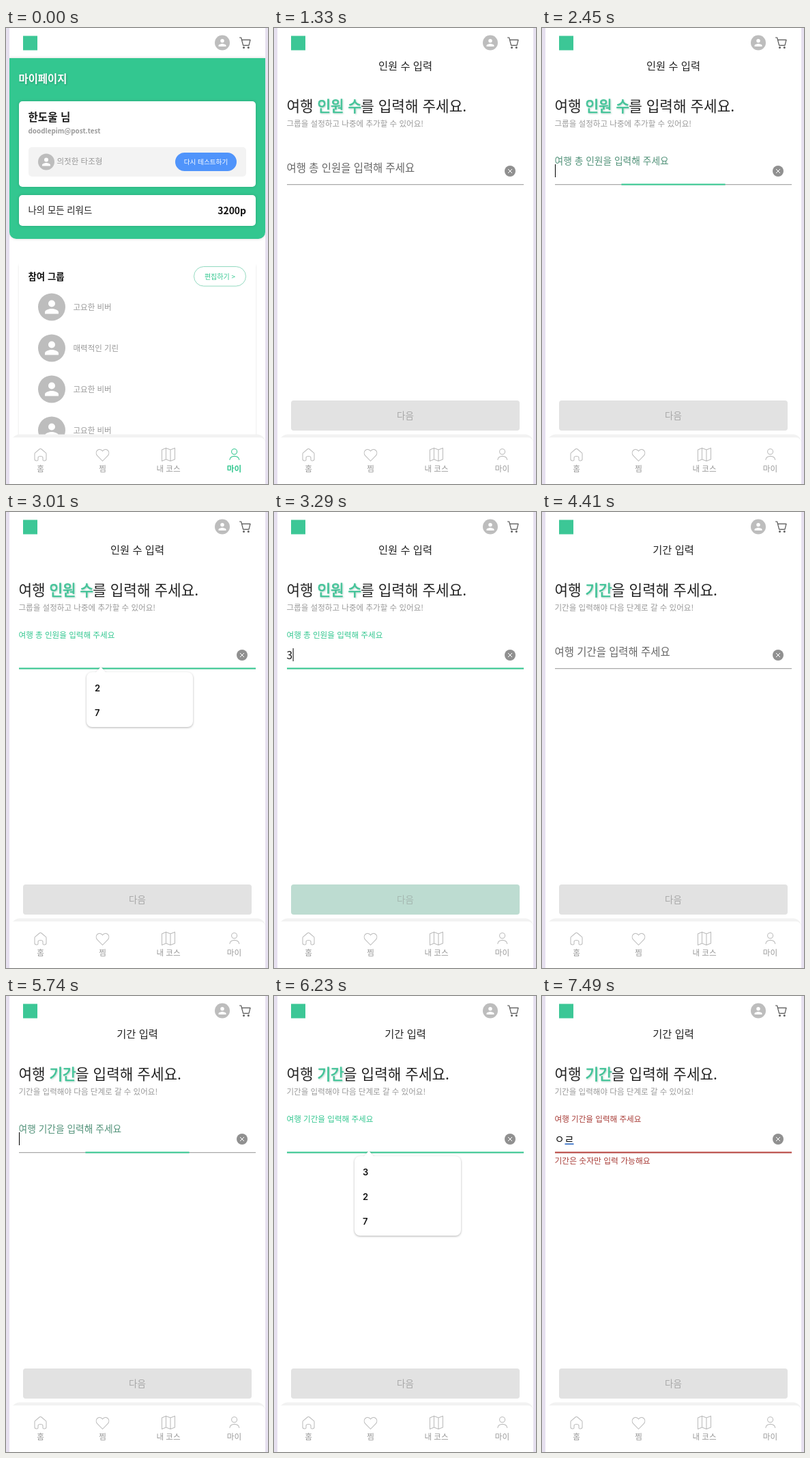
An HTML page for the animation above (8 s loop, 384 by 666 pixels).

```html
<!DOCTYPE html>
<html lang="ko">
<head>
<meta charset="utf-8">
<title>여행 정보 입력</title>
<style>
  html, body { margin: 0; height: 100%; overflow: hidden; background: #fff; }
  svg { display: block; width: 100vw; height: 100vh; }
  text { font-family: 'Noto Sans CJK KR', 'Noto Sans CJK', 'Noto Sans', sans-serif; white-space: pre; }
  .card { filter: drop-shadow(0 0 2px rgba(0,0,0,.16)); }
  .soft { filter: drop-shadow(0 4px 1.5px rgba(0,0,0,.12)); }
  .glow { filter: drop-shadow(1.5px 1.5px 1px rgba(70,150,120,.4)); }
  .lit { filter: drop-shadow(1px 1.5px 1px rgba(0,0,0,.25)); }
  .pop { filter: drop-shadow(0 1px 1.5px rgba(0,0,0,.3)); }
</style>
</head>
<body>
<svg id="stage" viewBox="0 0 384 666" preserveAspectRatio="none"></svg>
<script>
const LOOP = 8000, TICK = 70;
const GREEN = '#33c790', GRAY = '#bdbdbd', ICON = '#bcbcbc', RED = '#a83c37';
const stage = document.getElementById('stage');
const $ = id => document.getElementById(id);

// Text placed by its vertical middle
const text = (x, mid, size, str, fill, more = '') =>
  `<text x="${x}" y="${mid + size * .37}" font-size="${size}" fill="${fill}" ${more}>${str}</text>`;
const rect = (x, y, w, h, r, fill, more = '') =>
  `<rect x="${x}" y="${y}" width="${w}" height="${h}" rx="${r}" fill="${fill}" ${more}/>`;
const BOLD = 'font-weight="700"', MID = 'text-anchor="middle"', END = 'text-anchor="end"';

const avatar = (x, y, r) => {
  const k = r / 16;
  return `<circle cx="${x}" cy="${y}" r="${r}" fill="${GRAY}"/>
    <g transform="translate(${x - 12 * k} ${y - 12 * k}) scale(${k})" fill="#fff">
    <circle cx="12" cy="8" r="4"/><path d="M12 14c-2.67 0-8 1.34-8 4v2h16v-2c0-2.66-5.33-4-8-4z"/></g>`;
};

const topBar = () => rect(25, 11.5, 21, 21, 0, '#3cc796') + avatar(317, 21.5, 11) +
  `<g fill="none" stroke="#555" stroke-width="1.2" stroke-linejoin="round">
   <path d="M342 14h2.6l3 11.3h8.4l2-8h-12.4"/>
   <circle cx="348.5" cy="28.6" r=".9"/><circle cx="355.3" cy="28.6" r=".9"/></g>`;

const myPage = () => {
  const names = ['고요한 비버', '매력적인 기린', '고요한 비버', '고요한 비버'];
  return `<path d="M5 44H380V298a10 10 0 0 1-10 10H15a10 10 0 0 1-10-10z" fill="${GREEN}" class="card"/>` +
    text(18.5, 74, 15.4, '마이페이지', '#fff', BOLD + ' class="lit"') +
    rect(19, 107, 347, 125, 5, '#fff', 'class="card"') +
    text(32.5, 130, 15.6, '한도울 님', '#1a1a1a', BOLD) +
    text(32.5, 150, 9.9, 'doodlepim@post.test', '#999', BOLD) +
    rect(33, 174, 319, 43, 5, '#f3f3f3') + avatar(59, 195.5, 12) +
    text(74.5, 195, 11.55, '의젓한 타조형', '#999', 'font-weight="500"') +
    rect(248, 182, 90, 27, 13.5, '#5094fb') +
    text(293, 195.5, 9.6, '다시 테스트하기', '#fff', MID + ' font-weight="500"') +
    rect(19, 244, 347, 45, 5, '#fff', 'class="card"') +
    text(32.5, 266.5, 13.4, '나의 모든 리워드', '#222') +
    text(352, 267, 13.9, '3200p', '#111', BOLD + ' ' + END) +
    rect(19, 340, 347, 300, 5, '#fff', 'class="soft"') +
    text(32.5, 363, 13.4, '참여 그룹', '#111', BOLD) +
    rect(275.5, 348.5, 76, 28.5, 14.25, '#fff', 'stroke="#93dac0"') +
    text(313.5, 363, 10, '편집하기 &gt;', GREEN, MID + ' font-weight="500"') +
    names.map((n, i) => avatar(67, 407.5 + 60 * i, 20) +
      text(98.5, 407.5 + 60 * i, 11.5, n, '#999')).join('');
};

const form = () => `
  ${text(192.5, 55.5, 15.3, '', '#222', MID + ' id="title"')}
  ${text(18.5, 114, 21.3, '여행', '#222')}
  ${text(63.4, 114, 21.3, '', '#42c398', 'stroke="#42c398" stroke-width=".7" class="glow" id="key"')}
  ${text(0, 114, 21.3, '', '#222', 'id="rest"')}
  ${text(18.5, 140, 11.55, '', '#999', 'id="hint"')}
  <text id="label" font-size="15.45"></text>
  ${text(18.6, 209, 15.45, '', '#111', 'id="value"')}
  ${rect(33.5, 215.3, 13, 1.8, 0, '#3c74c8', 'id="compose"')}
  ${rect(19, 199, 1, 19, 0, '#000', 'id="caret"')}
  <circle cx="346" cy="209" r="8" fill="#909090"/>
  <path d="M343 206l6 6m0-6l-6 6" stroke="#fff" fill="none"/>
  ${rect(19, 228.2, 347, 1, 0, '#949494')}
  ${rect(19, 227.5, 347, 2, 0, GREEN, 'id="line"')}
  ${text(18.5, 241, 11.8, '기간은 숫자만 입력 가능해요', RED, 'id="error"')}
  <g id="popup"><g class="pop"><path d="M131 235l8-9 8 9z" fill="#fff"/>
  ${rect(118, 234, 156, 116, 8, '#fff', 'id="sheet"')}</g>
  ${[0, 1, 2].map(i => `<text id="opt${i}" x="130" y="${261.5 + 36 * i}" font-size="13" font-weight="600"
     style="font-family:Inter,sans-serif" fill="#111"></text>`).join('')}</g>
  ${rect(25, 544, 335, 44, 4, '#e2e2e2', 'id="next"')}
  ${text(192.5, 566, 13.5, '다음', '#000', MID + ' id="nextText"')}`;

const navBar = () => {
  const icon = (id, d) => `<path id="${id}" d="${d}" fill="none" stroke="${ICON}" stroke-width="1.05" stroke-linejoin="round"/>`;
  const name = (x, s, id) => text(x, 643.5, 11.6, s, '#999', `${MID} font-weight="500" id="${id}"`);
  return rect(8, 593.5, 372, 80, 12, '#f2f2f2') + rect(5, 598, 375, 80, 8, '#fff') +
    icon('home', 'M42 622q0-1 .8-1.7l6.4-5.3q1.3-1 2.6 0l6.4 5.3q.8.7.8 1.7v7.5q0 2.5-2.5 2.5h-1q-1.5 0-1.5-1.5v-3q0-2-3.5-2t-3.5 2v3q0 1.5-1.5 1.5h-1q-2.5 0-2.5-2.5z') +
    icon('heart', 'M141.5 632.5l-7.7-7.8c-5-6 3-13 7.7-6.7c4.7-6.3 12.7.7 7.7 6.7z') +
    icon('map', 'M228.5 616l6-2.5 6.5 2.5 6.5-2.5v16.5l-6.5 2.5-6.5-2.5-6 2.5zM234.5 613.5v16.5M241 616v16.5') +
    icon('me', 'M330.6 618.7a4 4 0 1 1 8 0a4 4 0 1 1-8 0M327.8 631c0-7.5 14-7.5 14 0') +
    name(50.5, '홈', 'homeText') + name(141.5, '찜', 'heartText') +
    name(238, '내 코스', 'mapText') + name(334.5, '마이', 'meText');
};

stage.innerHTML = rect(0, 0, 384, 666, 0, '#fff') +
  `<g id="my">${myPage()}</g><g id="form">${form()}</g>` + topBar() + navBar() +
  rect(0, 0, 5, 666, 0, '#e6e0ef') + rect(380, 0, 4, 666, 0, '#e6e0ef');

// Cubic Bezier easing solved by bisection
const bezier = (x1, y1, x2, y2) => x => {
  if (x <= 0) return 0;
  if (x >= 1) return 1;
  const at = (a, b, s) => 3 * a * s * (1 - s) ** 2 + 3 * b * s * s * (1 - s) + s ** 3;
  let lo = 0, hi = 1;
  for (let i = 0; i < 24; i++) {
    const s = (lo + hi) / 2;
    if (at(x1, x2, s) < x) lo = s; else hi = s;
  }
  return at(y1, y2, lo);
};
const easeOut = bezier(0, 0, .2, 1), easeStd = bezier(.4, 0, .2, 1);
const mix = (a, b, p) => {
  const ch = (c, i) => parseInt(c.slice(i, i + 2), 16);
  return `rgb(${[1, 3, 5].map(i => Math.round(ch(a, i) + (ch(b, i) - ch(a, i)) * p))})`;
};

const steps = [
  { title: '인원 수 입력', key: '인원 수', rest: '를 입력해 주세요.', restX: 127.2,
    hint: '그룹을 설정하고 나중에 추가할 수 있어요!', label: '여행 총 인원을 입력해 주세요',
    focus: 2417, typed: 3290, value: '3', end: 27.6, options: ['2', '7'], off: [[3010, 3290], [3780, 4340]] },
  { title: '기간 입력', key: '기간', rest: '을 입력해 주세요.', restX: 102,
    hint: '기간을 입력해야 다음 단계로 갈 수 있어요!', label: '여행 기간을 입력해 주세요',
    focus: 5707, typed: 7000, value: 'ㅇㄹ', end: 47, options: ['3', '2', '7'], off: [[6230, 6720], [7490, 8000]] }
];

const show = (id, on) => $(id).setAttribute('visibility', on ? 'inherit' : 'hidden');
const set = (id, attrs) => { for (const k in attrs) $(id).setAttribute(k, attrs[k]); };

function draw(t) {
  const onMy = t < 1330;
  show('my', onMy);
  show('form', !onMy);
  set('me', { stroke: onMy ? GREEN : ICON });
  set('meText', { fill: onMy ? GREEN : '#999', 'font-weight': onMy ? 700 : 500 });
  if (onMy) return;

  const second = t >= 4340, s = steps[+second];
  const typed = t >= s.typed, bad = second && typed;
  for (const k of ['title', 'key', 'rest', 'hint', 'label']) $(k).textContent = s[k];
  set('rest', { x: s.restX });

  const f = easeOut((t - s.focus) / 200);
  const color = bad ? mix(GREEN, RED, easeOut((t - 6960) / 200)) : mix('#666666', GREEN, f);
  set('label', { transform: `translate(18.5 ${209.7 - 25.4 * f}) scale(${1 - .25 * f})`, fill: color });
  set('line', { x: 192.5 - 173.5 * f, width: 347 * f, fill: bad ? '#b8433e' : GREEN });

  $('value').textContent = typed ? s.value : '';
  show('compose', bad);
  show('error', bad);
  set('caret', { x: typed ? s.end : 19 });
  show('caret', f > 0 && !s.off.some(([a, b]) => t >= a && t < b));

  const fade = Math.min(1, Math.max(0, (t - s.focus - 60) / 150));
  show('popup', fade > 0 && !typed);
  set('popup', { opacity: fade });
  set('sheet', { height: 8 + 36 * s.options.length });
  for (let i = 0; i < 3; i++) $('opt' + i).textContent = s.options[i] || '';

  const p = second ? 0 : easeStd((t - 3230) / 250) * typed;
  const a = .26 + .74 * p, c = Math.round(255 * p / a);
  set('next', { fill: mix('#e2e2e2', GREEN, p) });
  set('nextText', { fill: `rgba(${c},${c},${c},${a})` });
}

const start = performance.now();
function loop() {
  const t = (performance.now() - start) % LOOP;
  draw(Math.floor(t / TICK) * TICK);
  requestAnimationFrame(loop);
}
loop();
</script>
</body>
</html>
```
